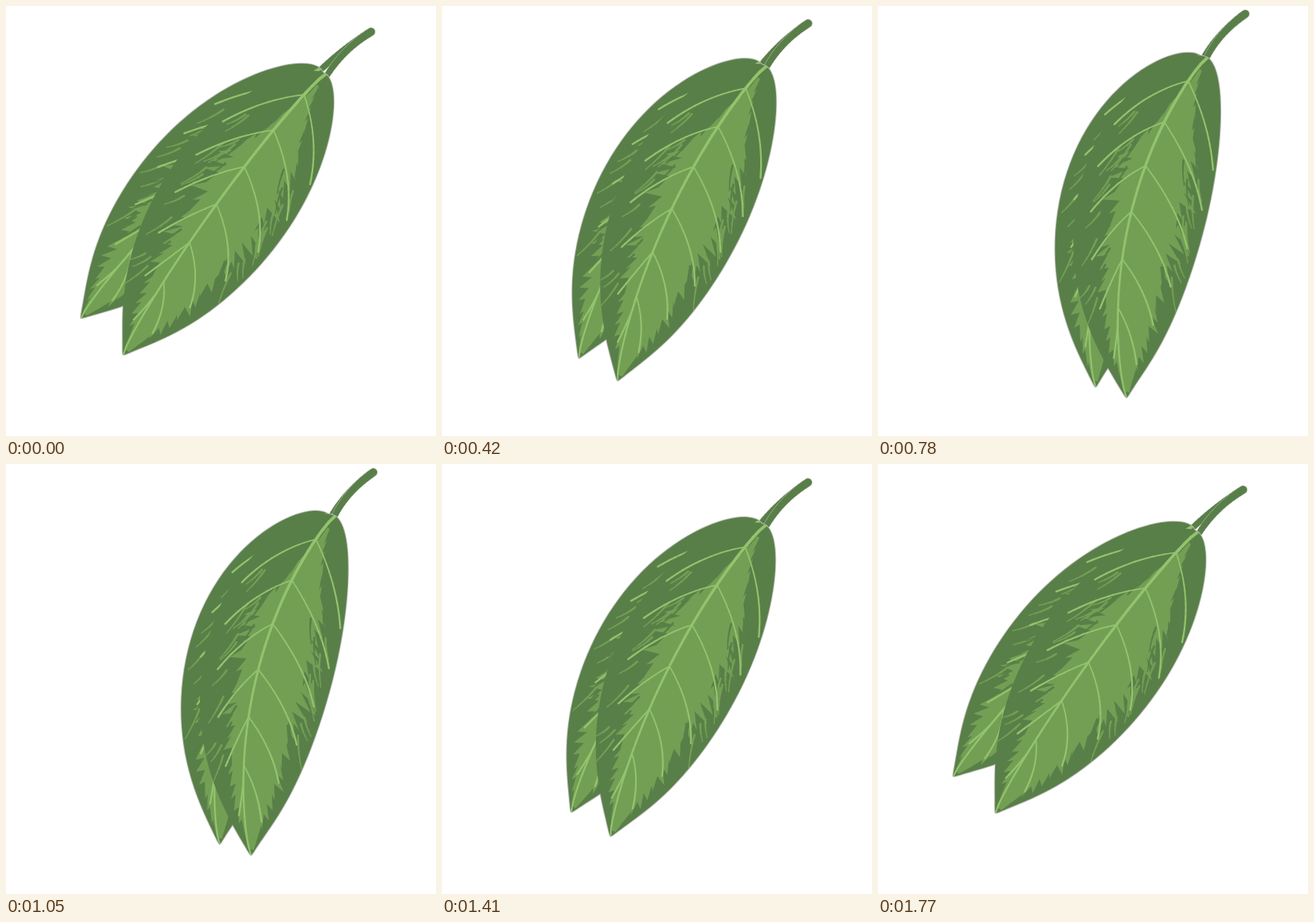
Animation of 550x550 px, one loop 1.8 s. Source, as an HTML page with a canvas:

```html
<!DOCTYPE html>
<html lang="en">
<head>
<meta charset="utf-8">
<title>Swaying leaves</title>
<style>
html, body { margin: 0; width: 100%; height: 100%; overflow: hidden; background: #fff; }
canvas { display: block; width: 550px; height: 550px; }
</style>
</head>
<body>
<canvas id="stage" width="550" height="550"></canvas>
<script>
const ctx = document.getElementById('stage').getContext('2d');
const LOOP = 1800, STEP = 30;
const DARK = '#597f48', MID = '#739f55', VEIN = '#93c36d', EDGE = '#b9bcb6';
const PIVOT = { x: 405, y: 88 };

function seeded(seed) {
  return () => (seed = (seed * 16807) % 2147483647) / 2147483647;
}

function range(n, fn) {
  return Array.from({ length: n }, (_, i) => fn(i));
}

function quad(a, b, c, n = 14) {
  return range(n + 1, i => {
    const t = i / n, u = 1 - t;
    return [0, 1].map(k => u * u * a[k] + 2 * u * t * b[k] + t * t * c[k]);
  });
}

// Half-width of a blade of width 1 at s, from the stalk (0) to the tip (1).
function profile(s) {
  return Math.abs(Math.sin(Math.PI * s ** 0.89)) ** 0.65 * (1 - 0.6 * s ** 12);
}

// Distance of the midrib from the straight line between stalk and tip.
function ribAt(s) {
  return 16 * (4 * s * (1 - s)) ** 0.7;
}

// Builds a leaf at rest. Side 1 is the upper left one, side -1 the lower right.
function makeLeaf({ base, tip, left, right, leftFill, rightFill, seed, ...sway }) {
  const rnd = seeded(seed);
  const dx = tip[0] - base[0], dy = tip[1] - base[1], len = Math.hypot(dx, dy);
  const place = (s, d) => [base[0] + dx * s - d * dy / len, base[1] + dy * s + d * dx / len];
  const width = (side, s) => side * (side > 0 ? left : right) * profile(s);
  const both = fn => [...fn(1), ...fn(-1).reverse()];

  const outline = both(side => range(61, i => {
    const s = (1 - Math.cos(Math.PI * i / 60)) / 2;
    return place(s, width(side, s));
  }));

  // Light middle with teeth that lean towards the tip.
  const patch = both(side => range(30, i => {
    const s = 0.04 + i * 0.031, outer = Math.min(1, s + 0.045);
    const grow = side > 0 ? leftFill * Math.min(1, s / 0.3) : rightFill * Math.min(1, s / 0.25);
    return [
      place(s, width(side, s) * grow * (0.8 + 0.15 * rnd())),
      place(outer, width(side, outer) * grow * (0.9 + 0.45 * rnd()))
    ];
  }).flat());

  const veins = [1, -1].flatMap(side => range(6, i => {
    const s = 0.085 + 0.135 * i, reach = 0.2 - 0.012 * i, end = s + reach;
    const d = width(side, end) * (1 - 0.6 * end * end) * (side > 0 ? 0.92 : 1);
    return quad(place(s, ribAt(s)), place(s + reach * 0.4, d * 0.65), place(end, d));
  }));

  const streaks = range(36, i => {
    const side = i % 2 ? 1 : -1, s = 0.22 + 0.55 * rnd(), at = 0.35 + 0.4 * rnd();
    const size = 0.02 + 0.03 * rnd();
    const fill = side > 0 ? leftFill : rightFill;
    return {
      color: at > fill ? MID : DARK,
      points: quad(place(s, width(side, s) * at), place(s + size, width(side, s) * (at + 0.05)),
        place(s + 2 * size, width(side, s) * (at + 0.16)), 4)
    };
  });

  const rib = range(41, i => place(i / 40, ribAt(i / 40)));
  return { outline, patch, veins, streaks, rib, ...sway };
}

const leaves = [
  makeLeaf({
    base: [402, 80], tip: [96, 399], left: 83, right: 72, leftFill: 0.58, rightFill: 0.6, seed: 71,
    turn: 0.125, bend: 0.00082, stretch: 0, shift: [11, -18]
  }),
  makeLeaf({
    base: [409, 87], tip: [150, 446], left: 90, right: 77, leftFill: 0.47, rightFill: 0.62, seed: 29,
    turn: 0.103, bend: 0.0007, stretch: 0.012, shift: [13, -21.5]
  })
];

// Bends a rest point about the stalk; the turn grows with distance.
function bender(u, { turn, bend, stretch, shift }) {
  return ([x, y]) => {
    const dx = x - PIVOT.x, dy = y - PIVOT.y, r = Math.hypot(dx, dy);
    const a = Math.atan2(dy, dx) - u * (turn + bend * r);
    const len = r * (1 + stretch * u);
    return [PIVOT.x + shift[0] * u + len * Math.cos(a), PIVOT.y + shift[1] * u + len * Math.sin(a)];
  };
}

function shape(points) {
  const path = new Path2D();
  points.forEach(p => path.lineTo(...p));
  path.closePath();
  return path;
}

// A stroke whose width runs from w0 to w1.
function brush(points, w0, w1, color) {
  ctx.strokeStyle = color;
  for (let i = 1; i < points.length; i++) {
    ctx.lineWidth = w0 + (w1 - w0) * i / points.length;
    ctx.beginPath();
    ctx.moveTo(...points[i - 1]);
    ctx.lineTo(...points[i]);
    ctx.stroke();
  }
}

function drawLeaf(leaf, warp, body) {
  ctx.fillStyle = DARK;
  ctx.fill(body);
  ctx.save();
  ctx.clip(body);
  ctx.fillStyle = MID;
  ctx.fill(shape(leaf.patch.map(warp)));
  leaf.streaks.forEach(k => brush(k.points.map(warp), 3, 1, k.color));
  leaf.veins.forEach(v => brush(v.map(warp), 1.6, 2.4, VEIN));
  brush(leaf.rib.map(warp), 4, 2, VEIN);
  ctx.restore();
}

// One strand from its rest foot to the shared end, drifting with u.
function drawStem(u, foot, drift) {
  const points = quad([foot[0] + drift[0] * u, foot[1] + drift[1] * u],
    [433 + 2.5 * u, 53.5 - 20 * u], [467 + 3 * u, 33 - 24 * u]);
  brush(points, 8, 11, EDGE);
  brush(points, 7, 10, DARK);
}

function draw(ms) {
  const t = Math.floor((ms % LOOP) / STEP) * STEP;
  const u = (1 - Math.cos(2 * Math.PI * t / LOOP)) / 2;
  const parts = leaves.map(leaf => {
    const warp = bender(u, leaf);
    return { leaf, warp, body: shape(leaf.outline.map(warp)) };
  });
  ctx.fillStyle = '#fff';
  ctx.fillRect(0, 0, 550, 550);
  ctx.lineCap = ctx.lineJoin = 'round';
  drawStem(u, [403, 81], [14, -15]);
  drawStem(u, [411, 88], [9, -21]);
  ctx.strokeStyle = EDGE;
  ctx.lineWidth = 2;
  parts.forEach(p => ctx.stroke(p.body));
  parts.forEach(p => drawLeaf(p.leaf, p.warp, p.body));
}

const start = performance.now();
function tick() {
  draw(performance.now() - start);
  requestAnimationFrame(tick);
}
tick();
</script>
</body>
</html>
```
